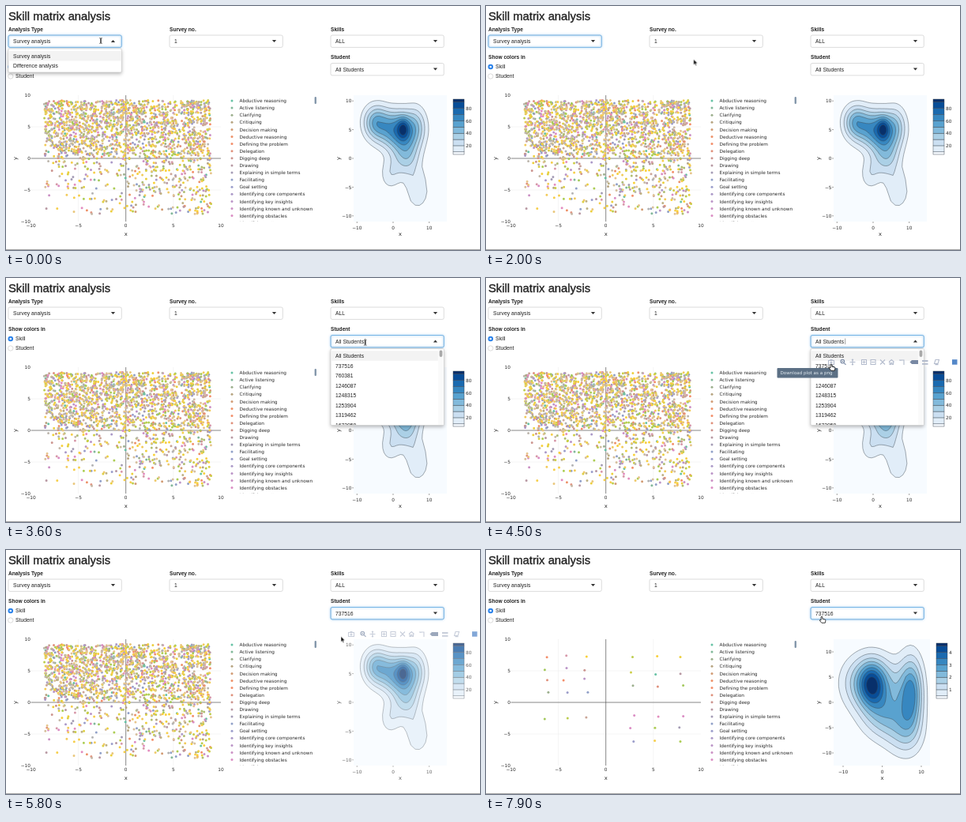
Recreate the animation shown at these times as an HTML page. Size 600 by 309 pixels, loop 8000 ms.

```html
<!DOCTYPE html>
<html lang="en">
<head>
<meta charset="utf-8">
<title>Skill matrix analysis</title>
<style>
html, body { margin: 0; width: 100%; height: 100%; overflow: hidden; background: #fff; }
svg { display: block; width: 100vw; height: 100vh; }
text { font: 6.75px "Liberation Sans", Arial, sans-serif; fill: #222; }
.title { font-size: 14.8px; fill: #222; stroke: #222; stroke-width: .35; }
.label { font-size: 6.6px; font-weight: bold; }
.plot text, .tip text { font: 5.8px "DejaVu Sans", Verdana, sans-serif; fill: #2a2a2a; }
.plot .axis { font-size: 6.8px; }
.end { text-anchor: end; }
.mid { text-anchor: middle; }
.box { fill: #fff; stroke: #c4c4c4; stroke-width: .6; }
.ring { fill: none; stroke: #66afe9; stroke-width: .8; filter: drop-shadow(0 0 1.5px #66afe9); }
.menu { filter: drop-shadow(0 2px 2px #0004); }
.grid { stroke: #eee; stroke-width: .6; }
.zero { stroke: #555; stroke-width: .7; }
.tick { stroke: #444; stroke-width: .5; }
.dots path { fill: none; stroke-width: 3; stroke-linecap: round; }
.contour { stroke: #3c4650; stroke-width: .45; }
.icon { fill: none; stroke: #b4bccd; stroke-width: 1.1; }
.icon.on { stroke: #7888a3; }

/* 1% = 80 ms */
.t { animation: 8s step-end infinite; }
.menu-a { animation-name: until700; }
.down-a { animation-name: from700; }
.ring-a { animation-name: until3200; }
.menu-b { animation-name: listB; }
.down-b { animation-name: notListB; }
.ring-b { animation-name: from3200; }
.all { animation-name: until5200; }
.one { animation-name: from5200; }
.bar { animation-name: bar; }
.tip { animation-name: tip; }
.dots-old { animation-name: until6900; }
.dots-new { animation-name: from6900; }
.cont-old { animation-name: until7000; }
.cont-new { animation-name: from7000; }
.beam { animation-name: beam; }
.arrow { animation-name: arrow; }
.hand { animation-name: hand; }
.fade-a { animation: fadeA 8s ease infinite; }
.fade-b { animation: fadeB 8s ease infinite; }
.pointer { animation: move 8s ease-in-out infinite; }

@keyframes until700 { 0% { opacity: 1 } 8.75%, 100% { opacity: 0 } }
@keyframes from700 { 0% { opacity: 0 } 8.75%, 100% { opacity: 1 } }
@keyframes until3200 { 0% { opacity: 1 } 40%, 100% { opacity: 0 } }
@keyframes from3200 { 0% { opacity: 0 } 40%, 100% { opacity: 1 } }
@keyframes listB { 0% { opacity: 0 } 40% { opacity: 1 } 65%, 100% { opacity: 0 } }
@keyframes notListB { 0% { opacity: 1 } 40% { opacity: 0 } 65%, 100% { opacity: 1 } }
@keyframes until5200 { 0% { opacity: 1 } 65%, 100% { opacity: 0 } }
@keyframes from5200 { 0% { opacity: 0 } 65%, 100% { opacity: 1 } }
@keyframes bar { 0% { opacity: 0 } 52.5% { opacity: 1 } 93.75%, 100% { opacity: 0 } }
@keyframes tip { 0% { opacity: 0 } 55% { opacity: 1 } 65%, 100% { opacity: 0 } }
@keyframes until6900 { 0% { opacity: 1 } 86.25%, 100% { opacity: 0 } }
@keyframes from6900 { 0% { opacity: 0 } 86.25%, 100% { opacity: 1 } }
@keyframes until7000 { 0% { opacity: 1 } 87.5%, 100% { opacity: 0 } }
@keyframes from7000 { 0% { opacity: 0 } 87.5%, 100% { opacity: 1 } }
@keyframes beam { 0% { opacity: 1 } 5% { opacity: 0 } 40% { opacity: 1 } 45.5%, 100% { opacity: 0 } }
@keyframes arrow { 0% { opacity: 0 } 8.75% { opacity: 1 } 31% { opacity: 0 } 66% { opacity: 1 } 94.5%, 100% { opacity: 0 } }
@keyframes hand { 0% { opacity: 0 } 5% { opacity: 1 } 8.75% { opacity: 0 } 31% { opacity: 1 } 40% { opacity: 0 }
  45.5% { opacity: 1 } 66% { opacity: 0 } 94.5%, 100% { opacity: 1 } }
@keyframes fadeA { 0%, 72.5% { opacity: 1 } 75.6%, 86.25% { opacity: .3 } 88.5%, 100% { opacity: 1 } }
@keyframes fadeB { 0%, 71.75% { opacity: 1 } 74.9%, 87.5% { opacity: .3 } 89.5%, 100% { opacity: 1 } }
@keyframes move {
  0%, 3% { transform: translate(120px, 44px) }
  7%, 18.75% { transform: translate(121px, 58px) }
  32.5%, 43.75% { transform: translate(455.5px, 80.5px) }
  52.5%, 65% { transform: translate(437px, 109px) }
  69%, 91.25% { transform: translate(424px, 109.5px) }
  96%, 100% { transform: translate(425px, 84px) }
}
</style>
</head>
<body>
<svg id="stage" viewBox="0 0 600 309" preserveAspectRatio="none"></svg>
<script>
const SET2 = ['66c2a5', 'fc8d62', '8da0cb', 'e78ac3', 'a0cc58', 'fad038', 'e5c494', 'b3b3b3'];
const BLUES = ['f7fbff', 'deebf7', 'c6dbef', '9ecae1', '6baed6', '4292c6', '2171b5', '08519c', '08306b'];
const SKILLS = ['Abductive reasoning', 'Active listening', 'Clarifying', 'Critiquing', 'Decision making',
  'Deductive reasoning', 'Defining the problem', 'Delegation', 'Digging deep', 'Drawing',
  'Explaining in simple terms', 'Facilitating', 'Goal setting', 'Identifying core components',
  'Identifying key insights', 'Identifying known and unknown', 'Identifying obstacles', 'Identifying patterns'];
const STUDENTS = ['All Students', '737516', '760381', '1246087', '1248315', '1253904', '1319462', '1672058'];
const TRACES = 40;

const range = n => [...Array(n).keys()];
const join = (list, fn) => list.map(fn).join('');
const text = (x, y, s, cls = '') => `<text x="${x}" y="${y}" class="${cls}">${s}</text>`;
const rect = (x, y, w, h, attrs = '') => `<rect x="${x}" y="${y}" width="${w}" height="${h}" ${attrs}/>`;
const path = (d, attrs = '') => `<path d="${d}" ${attrs}/>`;
const group = (cls, body, attrs = '') => `<g class="${cls}" ${attrs}>${body}</g>`;
const num = v => String(v).replace('-', '−');

function mix(stops, t) {
  const p = t * (stops.length - 1), i = Math.min(Math.floor(p), stops.length - 2), f = p - i;
  const part = (hex, k) => parseInt(hex.substr(k * 2, 2), 16);
  return `rgb(${range(3).map(k => Math.round(part(stops[i], k) * (1 - f) + part(stops[i + 1], k) * f))})`;
}
const skillColor = i => mix(SET2, i / (TRACES - 1));
const blue = i => mix(BLUES, i / 9);

function seeded(a) {
  return () => {
    a = a + 0x6D2B79F5 | 0;
    let t = Math.imul(a ^ a >>> 15, 1 | a);
    t = t + Math.imul(t ^ t >>> 7, 61 | t) ^ t;
    return ((t ^ t >>> 14) >>> 0) / 4294967296;
  };
}

// Form controls
const caret = (x, y, up) => path(up ? `M${x - 2.6} ${y + 1.5}h5.2l-2.6-3z` : `M${x - 2.6} ${y - 1.5}h5.2l-2.6 3z`, 'fill="#333"');
const field = (x, y) => rect(x, y, 143.3, 15.4, 'rx="2" class="box"');
const ring = (x, y, cls) => rect(x, y, 143.3, 15.4, `rx="2" class="ring t ${cls}"`);
const radio = (y, on) => on
  ? `<circle cx="5.8" cy="${y}" r="3.3" fill="#2a82ea"/><circle cx="5.8" cy="${y}" r="1.3" fill="#fff"/>`
  : `<circle cx="5.8" cy="${y}" r="3.2" class="box"/>`;

const controls = text(3, 17.5, 'Skill matrix analysis', 'title')
  + text(3, 32, 'Analysis Type', 'label') + text(207, 32, 'Survey no.', 'label')
  + text(411, 32, 'Skills', 'label') + text(411, 67.4, 'Student', 'label')
  + text(3, 67.4, 'Show colors in', 'label')
  + radio(77, true) + text(12, 79.4, 'Skill') + radio(89, false) + text(12, 91.4, 'Student')
  + field(3, 37) + field(207, 37) + field(411, 37) + field(411, 72.5)
  + text(9, 47.2, 'Survey analysis') + text(213, 47.2, '1') + text(417, 47.2, 'ALL')
  + caret(339.5, 44.6) + caret(543.5, 44.6)
  + group('t menu-a', caret(135.5, 44.6, true)) + group('t down-a', caret(135.5, 44.6))
  + group('t menu-b', caret(543.5, 80, true) + path('M454.7 76.5v7.5', 'class="tick"'))
  + group('t down-b', caret(543.5, 80))
  + group('t all', text(417, 82.6, STUDENTS[0])) + group('t one', text(417, 82.6, STUDENTS[1]))
  + ring(3, 37, 'ring-a') + ring(411, 72.5, 'ring-b');

const menuA = group('t menu-a', group('menu', rect(3, 54, 143.3, 30, 'rx="1.5" class="box"')
  + rect(3.3, 57, 142.7, 12.4, 'fill="#f3f3f3"')
  + text(9, 65.6, 'Survey analysis') + text(9, 78, 'Difference analysis')));

const menuB = group('t menu-b', group('menu', rect(411, 89.5, 143.3, 97, 'rx="1.5" class="box"')
  + rect(411.3, 92.3, 135.5, 12.5, 'fill="#f3f3f3"')
  + rect(547, 90, 7, 96, 'fill="#fafafa"') + rect(548.6, 91.5, 3.8, 8.5, 'rx="1.9" fill="#aaa"')
  + group('', join(STUDENTS, (s, i) => text(417, 101 + i * 12.5, s)), 'clip-path="url(#listClip)"')));

// Scatter plot
const sx = v => 151.7 + v * 12.02, sy = v => 193 - v * 8;
const dot = (x, y) => `M${x.toFixed(1)} ${y.toFixed(1)}h.01`;

function cloud() {
  const rnd = seeded(11);
  return join(range(TRACES), i => {
    const isYellow = i > 25 && i < 31;
    const d = join(range(isYellow ? 85 : 46), () => {
      if (rnd() < .82) return dot(sx(-8.6 + 17.5 * rnd()), sy(9.2 * rnd() ** .85));
      const x = rnd() < .68 ? 9 * rnd() ** .8 : -8.5 * rnd();
      return dot(sx(x), sy(-8.8 * rnd() ** 1.25));
    });
    return path(d, `stroke="${skillColor(i)}"`);
  });
}

// One student's answers: loose rows of three on each side
function answers() {
  const rnd = seeded(5), jitter = n => (rnd() - .5) * n;
  const rows = (x, gap, ys) => join(ys, y => join(range(3), c =>
    path(dot(x + c * gap + jitter(6), y + jitter(3)), `stroke="${skillColor(Math.floor(rnd() * 31))}"`)));
  return rows(76, 25, [135, 151, 164, 181, 213]) + rows(185, 31, [136, 156, 173, 210, 226, 242]);
}

const fives = [-10, -5, 0, 5, 10];
const legend = join(SKILLS, (s, i) => {
  const y = 120 + i * 9.1;
  return `<circle cx="286" cy="${y}" r="1.5" fill="${skillColor(i)}"/>` + text(295.5, y + 2.1, s);
});
const axisNames = (cx, yx) => text(cx, 291, 'x', 'axis mid')
  + `<text class="axis mid" transform="translate(${yx} 193) rotate(-90)">y</text>`;

const scatter = group('plot fade-a',
  join([-5, 5], v => path(`M${sx(v)} 113v160M31.5 ${sy(v)}h240.5`, 'class="grid"'))
  + path('M151.7 113v160M31.5 193h240.5', 'class="zero"')
  + join(fives, v => text(sx(v), 280, num(v), 'mid') + text(31, sy(v) + 2.1, num(v), 'end'))
  + axisNames(151.7, 14)
  + group('dots t dots-old', cloud()) + group('dots t dots-new', answers())
  + group('', legend, 'clip-path="url(#legendClip)"')
  + rect(390.6, 115, 2.3, 9, 'rx="1" fill="#7f93a8"'));

// Density plots: contours of a sum of Gaussian hills
const bell = (d, s) => Math.exp(-.5 * (d / s) ** 2);
const fieldOf = hills => (x, y) => hills.reduce((sum, h) => sum + h.amp * bell(x - h.x, h.sx) * bell(y - h.y, h.sy), 0);
const hill = (x, y, sx, sy, amp) => ({ x, y, sx, sy, amp });

// Walk outward from a centre along rays until the field falls below the level
function contour(f, [cx, cy], level) {
  const rays = 120;
  return 'M' + range(rays).map(i => {
    const a = i / rays * 2 * Math.PI;
    const at = r => [cx + r * Math.cos(a), cy + r * Math.sin(a)];
    let r = 0, step = 2;
    while (step > .05) f(...at(r + step)) > level ? r += step : step /= 2;
    return at(r).map(v => v.toFixed(1));
  }).join('L') + 'z';
}

// Levels above the hub's own height split into one loop for each peak
const landscape = (f, hub, peaks, unit) => join(range(9), i => {
  const level = (i + 1) * unit;
  const centres = f(...hub) > level ? [hub] : peaks.filter(p => f(...p) > level);
  return join(centres, c => path(contour(f, c, level), `fill="${blue(i + 1)}"`));
});

const classField = fieldOf([
  hill(497, 157, 17, 17, 66), hill(503, 155, 5, 9, 29), hill(468, 147, 11, 15, 45), hill(520, 150, 9, 18, 18),
  hill(507, 190, 12, 18, 34), hill(521, 233, 9, 15, 24), hill(486, 213, 9, 14, 16)]);
const studentField = fieldOf([
  hill(488, 168, 22, 23, 3), hill(488, 170, 10, 18, 1.7), hill(538, 180, 10.6, 31, 3),
  hill(530, 232, 16, 22, 1.2), hill(505, 208, 20, 22, 1.9)]);

function colorBar(x, labels) {
  const edge = i => i === 0 ? 188 : i === 10 ? 118 : 184.8 - (i - 1) * 7.88;
  return group('contour', join(range(10), i => rect(x, edge(i + 1), 14, edge(i) - edge(i + 1), `fill="${blue(i)}"`)))
    + join(labels, (s, i) => text(x + 16, 179 - i * 15.75, s));
}

function density(cls, width, x0, kx, ky, xTitle, shapes, bar) {
  return group('t ' + cls, rect(440, 113, width, 160, 'fill="#f7fbff"')
    + group('contour', shapes)
    + join([-10, 0, 10], v => path(`M${x0 + v * kx} 273v2`, 'class="tick"') + text(x0 + v * kx, 282.5, num(v), 'mid'))
    + join(fives, v => path(`M440 ${193 - v * ky}h-2`, 'class="tick"') + text(437.5, 195.1 - v * ky, num(v), 'end'))
    + axisNames(xTitle, 422.5) + bar);
}

const densities = group('plot fade-b',
  density('cont-old', 118, 490, 4.57, 7.28, 499,
    landscape(classField, [503, 157], [[503, 157]], 10), colorBar(566, [20, 40, 60, 80]))
  + density('cont-new', 122, 501.5, 4.95, 6.4, 501.5,
    landscape(studentField, [515, 203], [[488, 169], [538, 181]], .5), colorBar(570, [1, 2, 3, 4])));

// Plot tool bar
const icon = (d, on) => path(d, `class="icon ${on ? 'on' : ''}"`);
const tools = group('fade-b', group('t bar',
  icon('M433.5 104.5h7v5h-7zM435.5 103.6h3M436 107a1 1 0 1 0 2 0a1 1 0 1 0-2 0')
  + icon('M449 105.5a2.3 2.3 0 1 0 4.6 0a2.3 2.3 0 1 0-4.6 0M453 107.3l2.5 2.5M450.3 105.5h2', true)
  + icon('M460.5 106.5h7M464 103v7M463 104l1-1 1 1M463 109l1 1 1-1')
  + icon('M475.5 103.5h6v6h-6zM476.5 106.5h4M478.5 104.5v4')
  + icon('M487 103.5h6v6h-6zM488 106.5h4')
  + icon('M499 103.5l6 6M505 103.5l-6 6')
  + icon('M510 106.5l3.3-3 3.3 3M511 106.5v3h1.5v-2h1.5v2h1.5v-3')
  + icon('M523 104h6v6M525 104v1')
  + path('M536.5 106.5l2.5-2.6h8v5.2h-8z', 'fill="#7888a3"')
  + icon('M552 104.5h7.5M552 108.5h7.5M552 105.4h7.5M552 109.2h7.5')
  + icon('M569 103.5h4.5l-1.5 5h-4.5zM568.5 109.6h4')
  + rect(590, 103.2, 6.5, 6.5, 'fill="#5487c9"')));

const tip = group('t tip', path('M437 114.2l3-3 3 3z', 'fill="#5c7085"')
  + rect(368.5, 114, 77, 12.6, 'rx="1" fill="#5c7085"')
  + '<text x="372.5" y="122.3" style="font-size:5.6px;fill:#e4edf3">Download plot as a png</text>');

const pointer = group('pointer',
  group('t beam', path('M-1.6-3.4q1.6 0 1.6 1v4.8q0 1-1.6 1M1.6-3.4q-1.6 0-1.6 1v4.8q0 1 1.6 1', 'fill="none" stroke="#111" stroke-width=".8"'))
  + group('t arrow', path('M0 0v7l1.6-1.5 1.1 2.5 1.2-.5-1.1-2.5h2.3z', 'fill="#111" stroke="#fff" stroke-width=".5"'))
  + group('t hand', path('M-.9.6q.9-1 1.8 0v2.6l3.1.7q1 .3.9 1.4l-.6 3h-4.4l-2.7-3.2q.2-1 1.9-.2z', 'fill="#fff" stroke="#111" stroke-width=".8"')));

document.getElementById('stage').innerHTML =
  `<clipPath id="listClip">${rect(411, 90, 136, 96)}</clipPath>`
  + `<clipPath id="legendClip">${rect(278, 108, 114, 165)}</clipPath>`
  + controls + scatter + densities + menuA + menuB + tools + tip
  + rect(0, 308, 600, 1, 'fill="#a6a6a6"') + pointer;
</script>
</body>
</html>
```
